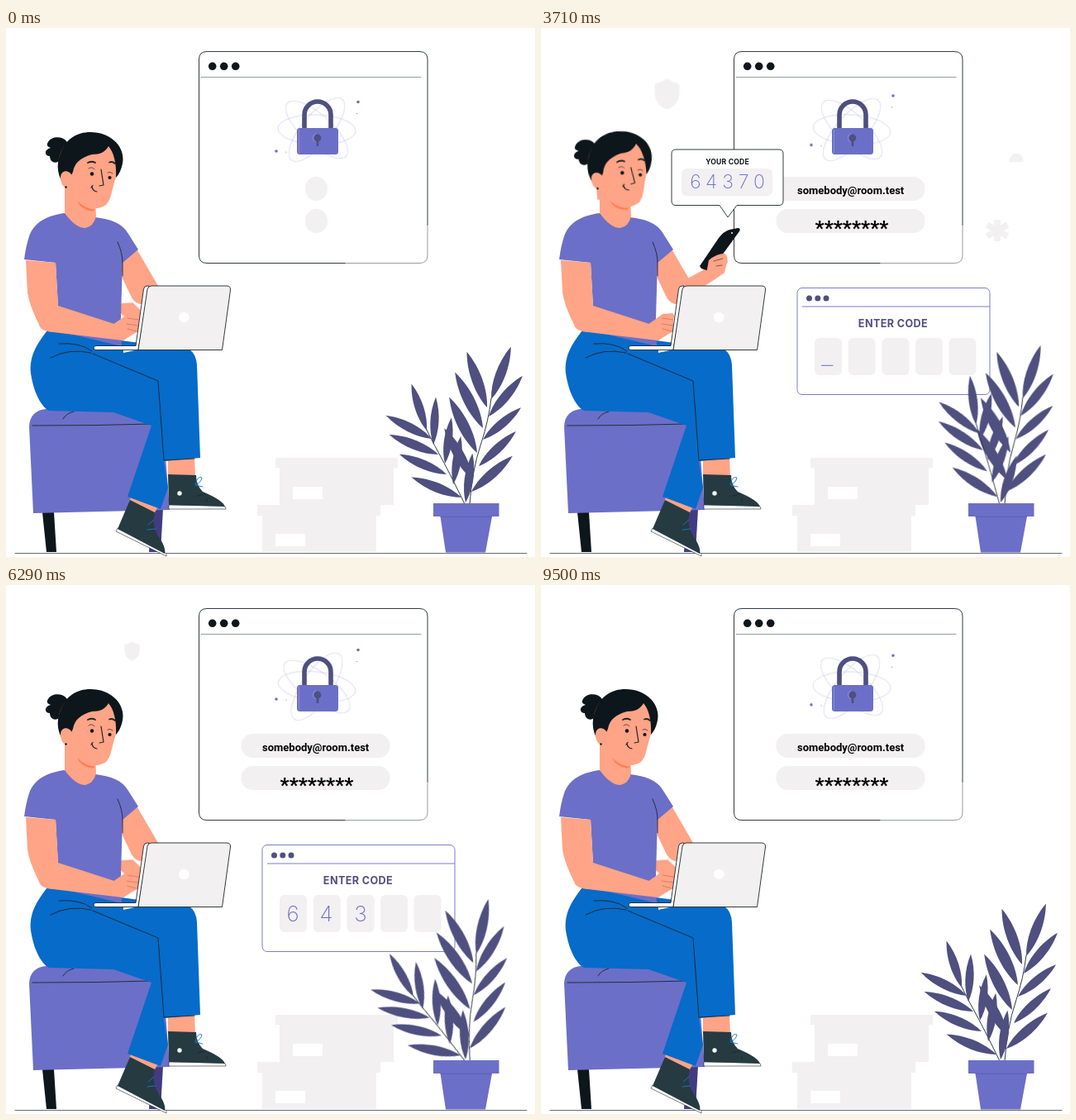
An HTML page without scripts for the animation above (9.57 s loop, 640 px wide and 640 px high).

```html
<!DOCTYPE html>
<html lang="en">
<head>
<meta charset="utf-8">
<title>Two-step login</title>
<style>
html, body { margin: 0; width: 100%; height: 100%; overflow: hidden; background: #fff }
svg { display: block; width: 100vw; height: 100vh }
.violet { fill: #6c6fc7 } .plum { fill: #4f4f80 } .pale { fill: #f2f0f1 } .skin { fill: #ffa486 }
.ink { fill: #0d161b } .blue { fill: #066bc9 } .shoe { fill: #263a42 } .white { fill: #fff }
.line { fill: none; stroke: #1c262b; stroke-width: .9; stroke-linecap: round; stroke-linejoin: round }
.edge { stroke: #1c262b; stroke-width: .9; stroke-linejoin: round }
.code { font: 200 23px Inter, sans-serif; text-anchor: middle; fill: #6c6fc7 }
.title { font: 700 12.6px Inter, sans-serif; letter-spacing: .4px; text-anchor: middle }
.login { font: 700 13px Roboto, sans-serif }

.move { animation: 9.57s cubic-bezier(.37,0,.63,1) infinite both }

/* plant */
.right-branch { animation-name: sway-right; transform-origin: 559px 574px }
@keyframes sway-right {
  0%, 99.3%, 100% { transform: none }
  21%, 73.5% { transform: rotate(-10.3deg) }
  47% { transform: rotate(.5deg) }
}
.left-branch { animation-name: sway-left; transform-origin: 556px 574px }
@keyframes sway-left {
  0%, 99.3%, 100% { transform: none }
  36.6% { transform: rotate(11.3deg) }
  63.7% { transform: rotate(-11.3deg) }
}

/* person */
.head { animation-name: tilt; transform-origin: 88px 235px }
@keyframes tilt {
  0%, 8.9%, 28.2%, 53%, 100% { transform: none }
  3.5%, 5%, 33%, 47% { transform: rotate(-5.5deg) }
}
.hand { animation-name: tap; transform-origin: 132px 366px }
@keyframes tap {
  0%, 8%, 11.5%, 15%, 18.6%, 22%, 58%, 62%, 66%, 70%, 74%, 100% { transform: none }
  9.7%, 13.3%, 16.8%, 20.4%, 60%, 64%, 68%, 72% { transform: rotate(13deg) }
}
.forearm { animation-name: lift; transform-origin: 147px 329px }
@keyframes lift {
  0%, 25%, 59.5%, 100% { transform: rotate(72deg) translate(-20px, 18px) }
  26.8% { transform: rotate(72deg) translate(0, 0) }
  33%, 51.2% { transform: rotate(0deg) translate(0, 0) }
  56.8% { transform: rotate(64deg) translate(0, 0) }
}

/* login window */
.orbit { animation-name: wobble; animation-duration: 4.785s; transform-origin: 376px 123px }
@keyframes wobble {
  0%, 45%, 100% { transform: none }
  17% { transform: rotate(var(--turn)) }
  75% { transform: rotate(2deg) }
}
.specks { animation-name: drift }
@keyframes drift {
  0% { transform: none }
  62.7% { transform: translateY(-11px); animation-timing-function: cubic-bezier(.4,0,.75,.65) }
  100% { transform: translateY(-4px) }
}
.pill { animation-name: widen }
@keyframes widen {
  0% { x: 362px; width: 27px }
  7.3%, 100% { x: 284.5px; width: 180px }
}
.sweep { animation-timing-function: linear }
.name-sweep { animation-name: type-name }
@keyframes type-name { 0%, 8.46% { transform: none } 17.87%, 100% { transform: translateX(145px) } }
.star-sweep { animation-name: type-stars }
@keyframes type-stars { 0%, 18.8% { transform: none } 23%, 100% { transform: translateX(100px) } }

/* pale icons */
.shoulders { animation-name: shoulders; transform-origin: 575px 162px }
@keyframes shoulders {
  0%, 6.3%, 39.6%, 100% { transform: scale(0) }
  9%, 37.2% { transform: none }
}
.face { animation-name: face; transform-origin: 575px 130px }
@keyframes face {
  0%, 6.8%, 38.4%, 100% { transform: translateY(30px) scale(0) }
  9.7% { transform: translateY(-2px) scale(1, 1.07) }
  11.5%, 36.6% { transform: none }
}
.star-out { animation-name: star-out }
@keyframes star-out { 0%, 36% { transform: none } 37%, 100% { transform: scale(0) } }
.star-in { animation-name: star-in }
@keyframes star-in {
  0%, 19.8% { transform: scale(0) }
  21.5% { transform: scale(1.12) }
  22.5%, 100% { transform: none }
}
.shield { animation-name: shield; transform-origin: 152.5px 80px }
@keyframes shield {
  0%, 37.6%, 66.9%, 100% { transform: scale(0) }
  41% { transform: scale(1.06) }
  42.5%, 62.7% { transform: none }
}

/* code popups */
.bubble { animation-name: bubble; transform-origin: 226px 229px }
@keyframes bubble {
  0%, 31.3%, 59.3%, 100% { transform: scale(0) }
  34.6% { transform: scale(1.05) }
  36%, 56.1% { transform: none }
}
.card { animation-name: card; transform-origin: 426.5px 379px }
@keyframes card {
  0%, 24.5% { transform: scale(0); animation-timing-function: cubic-bezier(.2,.75,.4,1) }
  30.7%, 80.5% { transform: none }
  84%, 100% { transform: scale(0) }
}
.digit { animation-name: digit }
@keyframes digit { 0%, 54.2% { opacity: 0 } 54.8%, 100% { opacity: 1 } }
.cursor { animation-name: advance; animation-timing-function: step-end }
@keyframes advance {
  0% { transform: none }
  54.3% { transform: translateX(40.7px) }
  58.8% { transform: translateX(81.4px) }
  63.3% { transform: translateX(122px) }
  67.8% { transform: translateX(162.7px) }
  72.3%, 100% { transform: scale(0) }
}
.blink { animation: blink 563ms step-end infinite }
@keyframes blink { 0% { opacity: 0 } 50% { opacity: 1 } }
</style>
</head>
<body>
<svg viewBox="0 0 640 640">
<defs>
  <path id="leaf" d="M0 0C-7-17-8-42 0-64C8-42 7-17 0 0Z"/>
  <path id="star" class="line" style="stroke:#f2f0f1;stroke-width:7.5;stroke-linecap:butt" d="M0-13V13M-12.5-7L12.5 7M-12.5 7L12.5-7"/>
  <rect id="slot" class="pale" y="375" width="33" height="45" rx="6"/>
  <linearGradient id="fade"><stop offset=".94" stop-color="#fff"/><stop offset="1"/></linearGradient>
  <mask id="name-mask"><rect class="move sweep name-sweep" x="150" y="180" width="160" height="40" fill="url(#fade)"/></mask>
  <mask id="star-mask"><rect class="move sweep star-sweep" x="171" y="215" width="160" height="50" fill="url(#fade)"/></mask>
</defs>

<!-- pale background -->
<g class="pale">
  <path d="M326 520H474V532H469V577H453V590H448V634H310V590H304V577H331V532H326Z"/>
  <path class="white" d="M347 555H383V570H347ZM326 612H362V627H326Z"/>
  <path class="move shield" d="M148 16Q152.500 13 157 16Q178 29 201 34Q205 36 205 40V72C205 110 185 135 152.500 145.500C120 135 100 110 100 72V40Q100 36 104 34Q127 29 148 16Z"/>
  <path class="move shoulders" d="M542 162C543 138 555 123 575 123S607 138 608 162Z"/>
  <ellipse class="move face" cx="575.500" cy="111" rx="18" ry="19"/>
</g>
<g transform="translate(552 245)"><g class="move star-out" style="animation-delay:.27s"><g class="move star-in"><use href="#star"/></g></g></g>
<g transform="translate(582 245)"><g class="move star-out" style="animation-delay:.13s"><g class="move star-in" style="animation-delay:.12s"><use href="#star"/></g></g></g>
<g transform="translate(612.500 245)"><g class="move star-out"><g class="move star-in" style="animation-delay:.24s"><use href="#star"/></g></g></g>
<path class="line" d="M11 635.500H630" stroke-opacity=".75"/>

<!-- login window -->
<path class="line" d="M510 238V38Q510 28.500 500 28.500H243Q233.500 28.500 233.500 38V275Q233.500 284.500 243 284.500H410"/>
<path class="line" d="M410 284.500H500Q510 284.500 510 275V238M236 59.500H502" stroke-opacity=".5"/>
<g class="ink"><circle cx="249.700" cy="46.300" r="4.800"/><circle cx="263.700" cy="46.300" r="4.800"/><circle cx="277.700" cy="46.300" r="4.800"/></g>
<g fill="none" stroke="#c3c3e8" stroke-width=".6">
  <g class="move orbit" style="--turn:-12deg"><ellipse cx="376" cy="123" rx="48" ry="18" transform="rotate(-50 376 123)"/></g>
  <g class="move orbit" style="--turn:-12deg"><ellipse cx="376" cy="123" rx="48" ry="18" transform="rotate(42 376 123)"/></g>
  <g class="move orbit" style="--turn:10deg"><ellipse cx="376" cy="123" rx="47" ry="18" transform="rotate(2 376 123)"/></g>
</g>
<g class="move specks violet">
  <circle cx="426" cy="89.500" r="1.800"/><circle cx="327" cy="149" r="1.800"/>
  <circle cx="424.500" cy="103.500" r=".6"/><circle cx="339" cy="150" r=".6"/>
</g>
<path fill="none" stroke="#4f4f80" stroke-width="5.600" d="M361 122V105A16 16 0 0 1 393 105V122"/>
<rect class="violet" x="352" y="121" width="50" height="32" rx="3.500"/>
<path fill="none" stroke="#9092d8" stroke-width=".9" d="M354.500 123V151M374 138A6 6 0 0 1 375 127.500"/>
<path class="plum" d="M375.700 136H378.300V143H375.700Z"/><circle class="plum" cx="377" cy="133" r="4.400"/>
<rect class="pale move pill" x="284.500" y="180" width="180" height="29" rx="14"/>
<rect class="pale move pill" x="284.500" y="219" width="180" height="29" rx="14"/>
<g mask="url(#name-mask)"><text class="login" x="310" y="200.500">somebody@room.test</text></g>
<g mask="url(#star-mask)"><text class="login" x="376" y="249.500" text-anchor="middle" style="font-size:24.500px">********</text></g>

<!-- code entry -->
<g class="move card">
  <rect x="310" y="314.500" width="233" height="129" rx="6" fill="#fff" stroke="#6c6fc7" stroke-width=".9"/>
  <path d="M316 337H543" stroke="#6c6fc7" stroke-width=".9"/>
  <g class="plum"><circle cx="324.500" cy="327" r="3.500"/><circle cx="334.800" cy="327" r="3.500"/><circle cx="345" cy="327" r="3.500"/></g>
  <text class="title plum" x="426" y="361.500">ENTER CODE</text>
  <use href="#slot" x="331"/><use href="#slot" x="371.700"/><use href="#slot" x="412.500"/><use href="#slot" x="453"/><use href="#slot" x="493.500"/>
  <g class="code" style="font-size:26px">
    <text class="move digit" x="347" y="407">6</text>
    <text class="move digit" x="387.500" y="407" style="animation-delay:.43s">4</text>
    <text class="move digit" x="429" y="407" style="animation-delay:.86s">3</text>
    <text class="move digit" x="469" y="407" style="animation-delay:1.29s">7</text>
    <text class="move digit" x="509" y="407" style="animation-delay:1.72s">0</text>
  </g>
  <g class="move cursor"><path class="blink" d="M339 408.300H353.500" stroke="#6c6fc7"/></g>
</g>

<!-- plant -->
<g class="plum">
  <g class="move right-branch">
    <path class="line" d="M561 576Q564 535 574 505T587 448"/>
    <use href="#leaf" transform="translate(587 449)rotate(20.600)scale(1.060)"/>
    <use href="#leaf" transform="translate(584 470)rotate(39.800)"/>
    <use href="#leaf" transform="translate(577 498)rotate(50)scale(.94)"/>
    <use href="#leaf" transform="translate(572 530)rotate(47)scale(.96)"/>
    <use href="#leaf" transform="translate(563 561)rotate(49)scale(1.030)"/>
    <use href="#leaf" transform="translate(582 459)rotate(-20)scale(1.120)"/>
    <use href="#leaf" transform="translate(577 484)rotate(-26.600)scale(1.180)"/>
    <use href="#leaf" transform="translate(570 514)rotate(-26.600)scale(1.180)"/>
    <use href="#leaf" transform="translate(565 547)rotate(-29)scale(1.120)"/>
  </g>
  <g class="move left-branch">
    <path class="line" d="M555 576Q535 535 524 515T509 486"/>
    <use href="#leaf" transform="translate(509 487)rotate(-18)scale(.93)"/>
    <use href="#leaf" transform="translate(515 497)rotate(-63)scale(.97)"/>
    <use href="#leaf" transform="translate(523 516)rotate(-68)"/>
    <use href="#leaf" transform="translate(533 540)rotate(-67)scale(.97)"/>
    <use href="#leaf" transform="translate(551 568)rotate(-68)scale(1.020)"/>
    <use href="#leaf" transform="translate(517 504)rotate(3)scale(.9)"/>
    <use href="#leaf" transform="translate(531 527)rotate(8)scale(.88)"/>
    <use href="#leaf" transform="translate(541 552)rotate(9)scale(.92)"/>
    <use href="#leaf" transform="translate(556 574)rotate(8)scale(.94)"/>
  </g>
</g>
<path class="violet" d="M517 575H596.500V591H588L580 634.500H532L525.500 591H517Z"/>
<path d="M525.500 591.300H588" stroke="#5a5cb0" stroke-width=".8"/>

<!-- raised arm with phone -->
<g class="move forearm">
  <path class="skin" d="M172 306L196 293L205 281L222 273Q227 276 225 283L222 296L209 305L186 320L165 334Z"/>
  <path class="ink" d="M192 288L215 254Q221 246 228 244L238 242Q242 242 240 246L208 290Q205 294 200 293L194 291Z"/>
  <circle class="white" cx="231" cy="248" r="1"/>
  <path class="skin" d="M203 281Q212 273 222 273Q227 275 220 279L226 282Q226 287 219 287L221 296L212 301L200 297Z"/>
  <path class="line" style="stroke-width:.6" d="M209 282L220 279M212 288L219 287"/>
</g>

<!-- stool -->
<path class="ink" d="M44 586H58L61 634H49Z"/>
<path fill="#413c80" d="M176 582H190L187 634H173Z"/>
<path class="violet" d="M28 482Q29 463 48 461L130 464L190 480L198 583L33 587Z"/>
<path class="line" d="M32 481L110 480.500L176 479M69 473Q73 466 82 464"/>

<!-- legs -->
<path class="skin" d="M196 521L228 518L229 543H196ZM151 567L184 579L179 588L149 574Z"/>
<path class="blue" d="M50 366C36 384 28 398 30 418C34 444 44 459 52 463L130 465L176 481L147 567L187 582L196 556L191 524L235 520L231 408Q230 394 222 389L139 378Z"/>
<path class="line" d="M105 394L184 427L191 523L228 521M54 399Q76 387 103 393M64 382Q90 380 104 391"/>
<path class="white edge" style="stroke-width:.6" d="M197 577L262 578Q267 579 266 582L197 582ZM135 605L192 634Q195 637 194 639L133 609Z"/>
<path class="shoe" d="M196 540L230 541Q230 553 238 561Q262 571 265 579L197 577ZM150 571L180 586Q176 600 183 613Q194 628 192 636L135 606Z"/>
<circle class="white" cx="210" cy="563" r="2.700"/>
<path class="line" style="stroke:#1976c8" d="M229 552Q232 541 237 544Q236 550 229 553L238 555M172 601L179 595M171 607L181 606"/>
<path class="line" d="M232 566L240 564M243 573V570"/>

<!-- torso and arms -->
<path class="skin" d="M139 282L159 269L184 312L168 334Q158 336 152 326L141 303Z"/>
<path class="violet" d="M70 224C46 228 34 236 28 252Q24 264 22 280L60 284L63 338L60 366L140 385L139 350L141 284L160 268L148 249C141 236 126 231 108 229Z"/>
<path class="white" d="M142 388L160 389L142 393Z"/>
<path class="line" d="M135 259Q141 272 141 284V300"/>
<path class="skin" d="M24 281L60 284L63 336L131 358L141 378L57 368Q42 367 40 359Q28 335 26 320Z"/>
<g class="move hand">
  <path class="skin" d="M129 359L139 352L147 346L159 345Q163 348 160 352L160 367L153 371L142 378L130 375Z"/>
  <path class="line" style="stroke:#c2644a;stroke-width:.6" d="M147 351L160 353M146 358L160 360M147 364L158 367"/>
</g>

<!-- head -->
<path class="skin" d="M71 185V224Q84 242 96 242Q106 240 109 228L108 205Z"/>
<g class="move head">
  <path class="ink" d="M74 138C68 130 55 131 51 138C48 142 51 144 54 145C46 147 46 155 53 155C53 163 61 165 65 160L74 150Z"/>
  <path d="M64 160Q66 147 74 139" fill="none" stroke="#ff5b3c" stroke-width=".6"/>
  <path class="ink" d="M73 194C62 180 60 166 66 152C72 134 86 126 102 126C126 126 142 142 141.500 159C141 169 137 177 133 181L120 150L85 180Z"/>
  <path class="skin" d="M71 195L71 206L86 209C97 219 111 221 121 214C128 207 128 194 133 181C134 163 130 150 124 143C120 150 114 153 104 153C90 157 83 163 81 174Z"/>
  <path class="skin" d="M79 177C75 171 66 172 66 181C66 188 69 193 76 195L84 190Z"/>
  <path fill="#ff7f55" d="M86 209Q96 219 108 219.500Q107 222 103 221.500Q90 219 86 209Z"/>
  <path class="line" style="stroke-width:1.800" d="M99 163Q104 160.500 108 163M125 162.500Q129 161 132 164"/>
  <path class="line" style="stroke-width:.7" d="M100 170Q104 167 107 171M123 175Q126 173 129 176"/>
  <circle class="ink" cx="104" cy="176.500" r="2.200"/><circle class="ink" cx="125.500" cy="181" r="2.100"/>
  <path class="line" style="stroke-width:1.200" d="M115 171L118 190L113 191M104 191Q104 197 110 198M103 193L105 190.500"/>
  <circle class="ink" cx="72.500" cy="192.500" r="1.200"/>
</g>

<!-- laptop -->
<path class="white edge" d="M157 384.500H109Q106 384.500 106 387Q106 389.500 109 389.500H160L173 312H171Q167 312 166.500 316Z"/>
<path class="pale edge" d="M160 389.500L171 316Q172 312 176 312H267Q272 312 271.500 317L261.500 389.500Z"/>
<circle class="white" cx="215.300" cy="350" r="6.300"/>

<!-- code bubble -->
<g class="move bubble">
  <path class="white edge" d="M163 147H288Q293 147 293 152V209Q293 214.500 288 214.500H237L226 229L216 214.500H163Q158 214.500 158 209V152Q158 147 163 147Z"/>
  <text class="title ink" x="225.500" y="164.700" style="font-size:8.600px;letter-spacing:.2px">YOUR CODE</text>
  <rect class="pale" x="170" y="170" width="110" height="33" rx="6"/>
  <text class="code" x="187 206 226 245 264" y="194">64370</text>
</g>
</svg>
</body>
</html>
```
